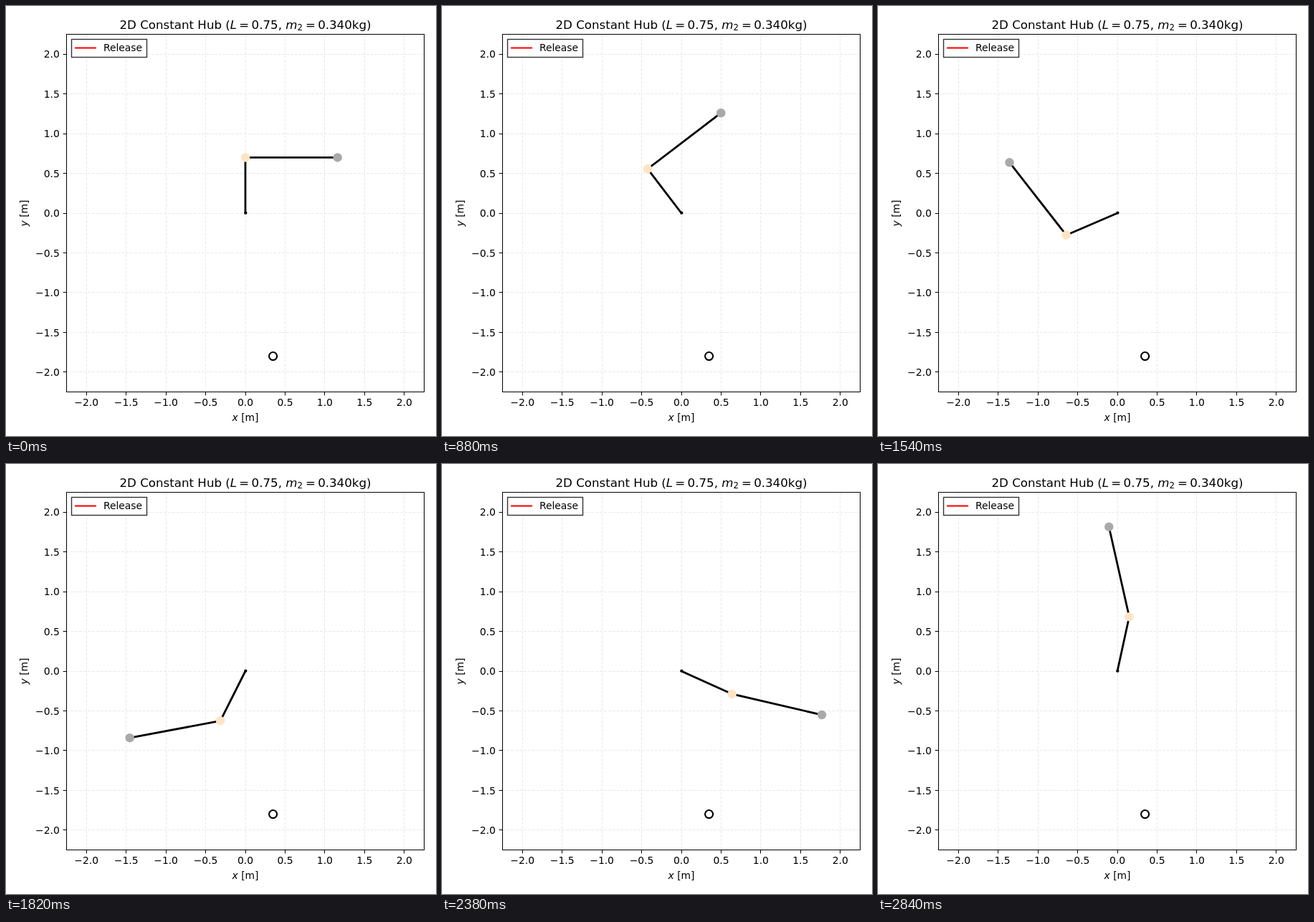
An HTML page for the animation above (2860 ms loop, 600 by 600 pixels).

```html
<!DOCTYPE html>
<html lang="en">
<head>
<meta charset="utf-8">
<title>Two-link arm</title>
<style>
  html, body { margin: 0; width: 100%; height: 100%; overflow: hidden; background: #fff; }
  svg { display: block; width: 600px; height: 600px; }
  text { font: 13.89px "DejaVu Sans", sans-serif; white-space: pre; }
  .title { font-size: 16.67px; }
  .sub { font-size: 11.67px; }
  .it { font-style: italic; }
  .mid { text-anchor: middle; }
  .end { text-anchor: end; }
  .grid { stroke: #e9e9e9; stroke-dasharray: 4.11 1.78; }
  .tick { stroke: #000; }
  .arm { stroke: #000; stroke-width: 2.8; stroke-linecap: square; }
</style>
</head>
<body>
<svg viewBox="0 0 600 600">
  <g id="grid"></g>
  <g id="ticks"></g>
  <line id="hub" class="arm"/>
  <line id="link" class="arm"/>
  <circle cx="334.4" cy="288.7" r="2.1"/>
  <circle id="joint" r="6.25" fill="#ffe4c4"/>
  <circle id="mass" r="6.25" fill="#a9a9a9"/>
  <circle cx="372.6" cy="488.6" r="5.55" fill="none" stroke="#000" stroke-width="2.1"/>
  <rect x="84.5" y="39.5" width="499" height="499" fill="none" stroke="#000"/>
  <rect x="91.5" y="46.5" width="105" height="25" fill="#fff" stroke="#333" stroke-width="1.4"/>
  <path d="M96 58.5H126" stroke="#f00" stroke-width="2.08"/>
  <text x="135.9" y="63">Release</text>
  <text class="title mid" x="334" y="31.5">2D Constant Hub (<tspan class="it">L</tspan><tspan dx="3.25">=</tspan><tspan dx="3.25">0.75, </tspan><tspan class="it">m</tspan><tspan class="sub" dy="2.7">2</tspan><tspan dx="4" dy="-2.7">=</tspan><tspan dx="3.25">0.340kg)</tspan></text>
  <text class="mid" x="334" y="579"><tspan class="it">x</tspan> [m]</text>
  <text class="mid" transform="translate(29.5 289) rotate(-90)"><tspan class="it">y</tspan> [m]</text>
</svg>
<script>
const ORIGIN = { x: 334, y: 289 }, SCALE = 499 / 4.5;
const HUB = 0.7 * SCALE, LINK = 1.16 * SCALE;
const LOOP = 2860, STEP = 20;

// time (s), hub angle, hub speed, link angle, link speed (degrees)
const KEYS = [
  [0, 0, 0, 0, 0],
  [0.9, 39.04, 86.8, 39.04, 86.8],
  [1.2, 70, 116, 71.8, 136],
  [1.58, 118.8, 139, 136, 204],
  [2.12, 200, 163, 271.8, 288],
  [2.38, 245.7, 190, 346.9, 286],
  [2.7, 312.45, 236, 432.45, 234],
  [2.84, 347.7, 267, 462.7, 199]
];

const $ = id => document.getElementById(id);

function add(parent, tag, attrs, text = "") {
  const el = document.createElementNS("http://www.w3.org/2000/svg", tag);
  set(el, attrs);
  el.textContent = text;
  $(parent).append(el);
}

function set(el, attrs) {
  for (const k in attrs) el.setAttribute(k, attrs[k]);
}

function line(parent, cls, x1, y1, x2, y2) {
  add(parent, "line", { class: cls, x1, y1, x2, y2 });
}

function drawAxes() {
  const snap = v => Math.floor(v) + 0.5;
  for (let v = -2; v <= 2; v += 0.5) {
    const px = ORIGIN.x + v * SCALE, py = ORIGIN.y - v * SCALE;
    const x = snap(px), y = snap(py);
    const label = v.toFixed(1).replace("-", "\u2212");
    line("grid", "grid", x, 538.5, x, 39.5);
    line("grid", "grid", 84.5, y, 583.5, y);
    line("ticks", "tick", x, 538.5, x, 543.4);
    line("ticks", "tick", 79.6, y, 84.5, y);
    add("ticks", "text", { class: "mid", x: px, y: 558.3 }, label);
    add("ticks", "text", { class: "end", x: 74.8, y: py + 5.2 }, label);
  }
}

// Cubic Hermite value of one angle; col is its column in KEYS
function angleAt(t, col) {
  let i = 0;
  while (i < KEYS.length - 2 && t > KEYS[i + 1][0]) i++;
  const a = KEYS[i], b = KEYS[i + 1], d = b[0] - a[0], s = (t - a[0]) / d, r = 1 - s;
  return r * r * ((1 + 2 * s) * a[col] + s * d * a[col + 1])
       + s * s * ((1 + 2 * r) * b[col] - r * d * b[col + 1]);
}

function polar(from, length, degrees) {
  const a = degrees * Math.PI / 180;
  return { x: from.x + length * Math.cos(a), y: from.y - length * Math.sin(a) };
}

function connect(el, a, b) {
  set(el, { x1: a.x, y1: a.y, x2: b.x, y2: b.y });
}

function render(ms) {
  const t = Math.floor((ms % LOOP) / STEP) * STEP / 1000;
  const joint = polar(ORIGIN, HUB, 90 + angleAt(t, 1));
  const mass = polar(joint, LINK, angleAt(t, 3));
  connect($("hub"), ORIGIN, joint);
  connect($("link"), joint, mass);
  set($("joint"), { cx: joint.x, cy: joint.y });
  set($("mass"), { cx: mass.x, cy: mass.y });
}

drawAxes();
const start = performance.now();
function tick() {
  render(performance.now() - start);
  requestAnimationFrame(tick);
}
tick();
</script>
</body>
</html>
```
